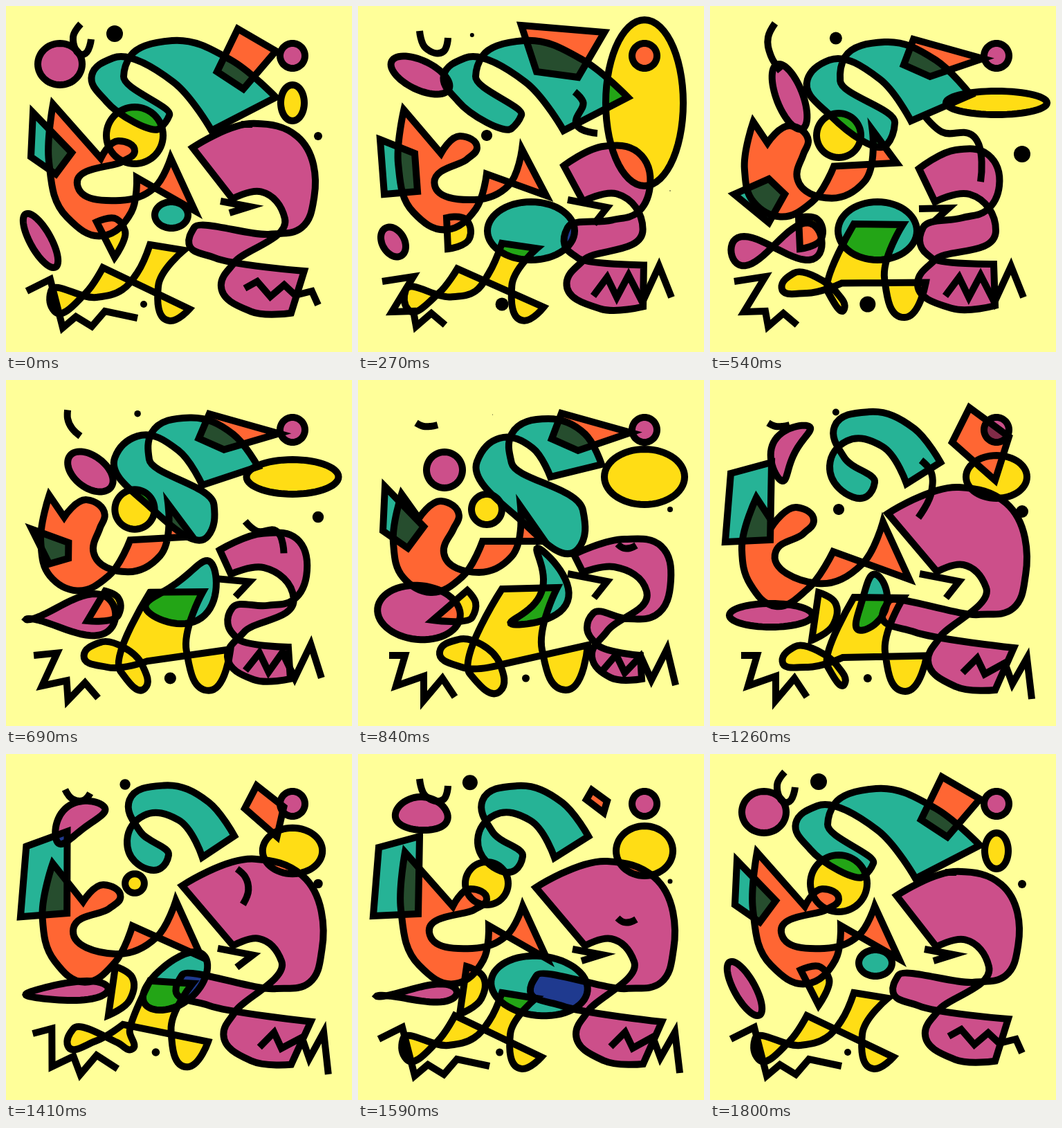
An HTML page with a canvas that plays this animation: 500x500 px, repeating every 1830 ms.

```html
<!DOCTYPE html>
<html lang="en">
<head>
<meta charset="utf-8">
<title>Shifting shapes</title>
<style>
  html, body { margin: 0; width: 100%; height: 100%; overflow: hidden; background: #ffff99; }
  canvas { display: block; width: 500px; height: 500px; }
</style>
</head>
<body>
<canvas id="stage" width="500" height="500"></canvas>
<script>
const ctx = document.getElementById('stage').getContext('2d');
const LOOP = 1830, CYCLE = 1800, STEP = 30, TURN = 2 * Math.PI;
const TIMES = [0, 270, 540, 840, 1260, 1590];
const COUNT = TIMES.length;

const COLORS = { teal: '#26b396', orange: '#ff6633', yellow: '#ffdd15', pink: '#cc4f8a' };
// Colour where two fills overlap
const MIX = {
  'orange teal': '#264d2e', 'teal yellow': '#23a516', 'pink teal': '#1f3a8f',
  'pink yellow': '#ff6633', 'orange yellow': '#ff6633', 'orange pink': '#802b47'
};

// ---- Timing: every value takes a key at each of TIMES and blends softly round the loop

const wrap = i => (i + COUNT) % COUNT;
const timeOf = i => TIMES[wrap(i)] + CYCLE * Math.floor(i / COUNT);

function blend(keys, t) {
  let i = COUNT - 1;
  while (TIMES[i] > t) i--;
  const span = timeOf(i + 1) - timeOf(i), u = (t - timeOf(i)) / span;
  const key = j => keys[wrap(j)];
  const slope = j => 0.6 * span * (key(j + 1) - key(j - 1)) / (timeOf(j + 1) - timeOf(j - 1));
  const w = u * u * (3 - 2 * u);
  return key(i) * (1 - w) + key(i + 1) * w
    + u * (1 - u) * (1 - u) * slope(i) + u * u * (u - 1) * slope(i + 1);
}

// A channel is a constant, a function of time or a list of keys
const valueOf = (channel, t) =>
  Array.isArray(channel) ? blend(channel, t) :
  typeof channel === 'function' ? channel(t) : channel;

const sway = (middle, reach) => t => middle - reach * Math.cos(TURN * t / CYCLE);

// ---- Outlines through points

// Key 1.3 is pose 1 moved 30% of the way to pose 2; keys may run past either end
function keyed(keys, poses) {
  const rows = poses.map(text => text.match(/\d+/g).map(Number));
  return rows[0].map((_, k) => keys.map(key => {
    const i = Math.max(0, Math.min(rows.length - 2, Math.floor(key)));
    return rows[i][k] + (rows[i + 1][k] - rows[i][k]) * (key - i);
  }));
}

// Handles that follow the curve through a smooth point
function handles(prev, p, next) {
  const ax = p[0] - prev[0], ay = p[1] - prev[1], bx = next[0] - p[0], by = next[1] - p[1];
  const la = Math.hypot(ax, ay) || 0.01, lb = Math.hypot(bx, by) || 0.01;
  const dx = ax / la * lb + bx / lb * la, dy = ay / la * lb + by / lb * la;
  const d = Math.hypot(dx, dy) || 1;
  const back = 0.37 * Math.min(la, 1.6 * lb) / d, ahead = 0.37 * Math.min(lb, 1.6 * la) / d;
  return [[p[0] - dx * back, p[1] - dy * back], [p[0] + dx * ahead, p[1] + dy * ahead]];
}

// In a mask, "x" is a sharp corner and "o" a smooth point
function trace(mask, channels, open, t) {
  const path = new Path2D(), n = mask.length;
  const v = channels.map(channel => blend(channel, t));
  const pts = [...mask].map((_, i) => [v[2 * i], v[2 * i + 1]]);
  const ctl = pts.map((p, i) =>
    mask[i] === 'x' ? [p, p] : handles(pts[(i + n - 1) % n], p, pts[(i + 1) % n]));
  path.moveTo(...pts[0]);
  for (let i = 0; i < (open ? n - 1 : n); i++) {
    const j = (i + 1) % n;
    if (mask[i] + mask[j] === 'xx') path.lineTo(...pts[j]);
    else path.bezierCurveTo(...ctl[i][1], ...ctl[j][0], ...pts[j]);
  }
  if (!open) path.closePath();
  return path;
}

function blob(color, mask, keys, ...poses) {
  const channels = keyed(keys, poses);
  return { color, path: t => trace(mask, channels, false, t) };
}

function line(mask, keys, ...poses) {
  const channels = keyed(keys, poses);
  return t => trace(mask, channels, true, t);
}

// ---- Ovals that can tilt, bend like a bean or twist into an eight

function oval(color, { x, y, rx, ry = rx, tilt = 0, bend = 0, twist = 0 }) {
  const channels = [x, y, rx, ry, tilt, bend, twist];
  const path = t => {
    const [cx, cy, a, b, angle, curl, eight] = channels.map(channel => valueOf(channel, t));
    const p = new Path2D(), c = Math.cos(angle), s = Math.sin(angle);
    for (let i = 0; i < 60; i++) {
      const q = TURN * i / 60, u = Math.cos(q);
      const px = Math.max(0.5, a) * u;
      const py = Math.max(0.5, b) * Math.sin(q) + curl * u * u + eight * Math.sin(2 * q);
      p.lineTo(cx + px * c - py * s, cy + px * s + py * c);
    }
    p.closePath();
    return p;
  };
  return { color, path };
}

// ---- The picture

const shapes = [
  blob('teal', 'xoooooooooox', [0, 0, 0.35, 1, 2, 2],
    '390,132 325,78 240,50 180,72 170,102 236,158 222,177 145,138 124,100 155,75 242,110 297,180',
    '352,122 328,78 275,56 222,78 222,120 325,188 318,244 230,198 172,118 205,84 252,98 278,140',
    '333,119 295,70 230,46 180,67 194,112 238,148 227,168 186,156 173,124 198,88 249,96 284,150'),
  blob('orange', 'xxooooooxxxoooo', [1, 1.35, 2.1, 2, 0, 1],
    '67,170 92,208 125,184 150,203 135,222 95,248 155,294 220,266 250,205 288,288 178,248 140,303 95,327 58,295 46,245',
    '68,142 137,220 162,195 186,210 168,225 103,258 165,281 215,262 238,220 273,296 189,248 181,298 140,332 88,305 62,225',
    '63,165 88,200 120,175 146,196 138,215 124,250 175,278 222,255 235,183 270,233 180,233 150,285 105,307 65,285 51,235'),
  blob('pink', 'xooooooooxxooooox', [0.28, 0.9, 1, 2, 0, 0],
    '257,193 360,155 428,178 456,282 438,330 388,339 258,320 249,343 295,364 439,387 412,448 355,443 315,405 332,372 399,300 366,267 328,277',
    '302,235 355,208 402,215 418,260 400,295 365,306 308,320 304,345 320,364 410,373 412,433 350,437 300,400 325,367 413,325 375,272 325,283',
    '312,252 385,230 438,240 452,290 430,340 390,345 340,337 331,358 345,382 408,398 410,432 365,430 338,400 360,363 417,305 370,270 325,278'),
  blob('yellow', 'xxooxxoooooo', [0, 0.05, 0.7, 1, 0.72, 0],
    '208,345 257,353 220,405 237,455 265,438 140,378 115,415 70,441 65,412 130,421 168,410 190,385',
    '208,302 288,300 266,390 300,448 332,383 212,410 150,415 118,393 145,375 205,410 205,450 162,425'),
  blob('teal', 'xxxx', [1, 2, 3, 1, 0, 0],
    '30,135 89,119 87,231 22,234',
    '39,154 95,212 72,243 36,218',
    '32,193 82,213 86,268 38,272',
    '35,272 85,250 108,272 85,313'),
  blob('orange', 'xxxx', [1, 2, 3, 3, 0, 4],
    '375,40 432,82 412,145 350,90',
    '335,33 390,65 343,120 305,95',
    '236,28 356,38 318,103 258,95',
    '294,48 394,76 318,102 280,85',
    '338,52 360,68 355,85 330,66'),
  blob('yellow', 'xoox', [0, 1, 1, 2, 3, 3],
    '131,312 160,308 172,325 157,363',
    '128,306 155,308 161,336 130,351',
    '158,304 170,322 165,343 108,347',
    '157,307 181,322 178,354 147,376'),
  oval('pink', {
    x: [78, 90, 115, 125, 107, 92], y: [84, 100, 131, 130, 98, 86],
    rx: [32, 46, 50, 26, 44, 38], ry: [30, 21, 19, 26, 17, 24],
    tilt: [0, 0.45, 1.2, 0, -1.1, 0.05], bend: [0, 0, 0, 0, 18, 4]
  }),
  oval('teal', {
    x: [239, 250, 242, 284, 237, 262], y: [302, 325, 325, 313, 324, 335],
    rx: [24, 63, 57, 58, 42, 70], ry: [19, 42, 42, 20, 18, 43],
    tilt: [0, 0, 0, -1.23, -1.28, 0.1], bend: [0, 0, 0, -45, -10, 0]
  }),
  oval('pink', {
    x: [50, 51, 96, 88, 88, 85], y: [339, 341, 347, 336, 340, 347],
    rx: [44, 23, 66, 60, 60, 58], ry: [15, 16, 4, 39, 17, 9],
    tilt: [1.06, 1.05, -0.15, 0.1, 0, -0.05], twist: [0, 0, 24, 0, 0, 6]
  }),
  oval('pink', { x: 414, y: 72, rx: 18 }),
  oval('yellow', { x: 414, y: 140, rx: [17, 56, 73, 58, 44, 41], ry: [26, 120, 17, 40, 31, 36] }),
  oval('yellow', { x: 186, y: 187, rx: [41, 3, 32, 22, 3, 31] })
];

const lines = [
  line('xoox', [0, 1, 2, 3, 3, 1],
    '108,26 97,45 112,70 123,48',
    '89,36 98,61 123,66 130,46',
    '94,25 84,45 88,72 102,94',
    '84,62 95,67 105,67 115,65'),
  line('xoox', [0, 1, 2, 4, 3, 4],
    '340,171 345,171 350,171 356,171',
    '313,124 325,138 316,172 346,184',
    '311,160 335,182 378,186 391,254',
    '305,116 318,130 320,162 301,199',
    '375,237 384,243 393,243 402,239'),
  line('xxx', [0, 1, 2, 1, 1, 0],
    '310,282 352,290 323,299',
    '303,280 360,291 341,315',
    '302,293 345,292 323,312'),
  line('xxxxxxx', [0, 1, 1, 1.5, 2, 2],
    '345,408 363,398 382,420 402,403 418,418 442,412 451,432',
    '340,419 360,392 374,421 391,389 411,428 435,376 453,421',
    '365,423 386,402 397,425 426,409 437,439 458,402 465,461'),
  line('xxxxxxx', [0, 1, 1, 2, 2, 0],
    '30,412 64,395 82,465 101,449 124,463 143,441 190,451',
    '35,398 80,391 49,442 80,441 84,463 106,444 126,461',
    '45,398 68,398 55,442 95,428 95,463 122,431 140,458')
];

const dots = [
  { x: sway(176, 19), y: sway(45, 5), r: [12, 3, 9, 0.5, 5, 11] },
  { x: 451, y: [188, 267, 214, 187, 190, 184], r: [6, 0.7, 12, 4, 9, 3.5] },
  { x: sway(221, 22), y: 431, r: [5, 9.5, 11.5, 5.5, 6, 5.5] }
];

function fillOverlap(a, b, color) {
  ctx.save();
  ctx.clip(a);
  ctx.fillStyle = color;
  ctx.fill(b);
  ctx.restore();
}

function draw(t) {
  ctx.fillStyle = '#ffff99';
  ctx.fillRect(0, 0, 500, 500);
  const paths = shapes.map(shape => shape.path(t));
  paths.forEach((path, i) => {
    ctx.fillStyle = COLORS[shapes[i].color];
    ctx.fill(path);
  });
  paths.forEach((a, i) => {
    for (let j = i + 1; j < paths.length; j++) {
      const mix = MIX[[shapes[i].color, shapes[j].color].sort().join(' ')];
      if (mix) fillOverlap(a, paths[j], mix);
    }
  });
  ctx.strokeStyle = ctx.fillStyle = '#000';
  ctx.lineWidth = 10;
  ctx.miterLimit = 10;
  paths.forEach(path => ctx.stroke(path));
  lines.forEach(path => ctx.stroke(path(t)));
  for (const { x, y, r } of dots) {
    ctx.beginPath();
    ctx.arc(valueOf(x, t), valueOf(y, t), Math.max(0, valueOf(r, t)), 0, TURN);
    ctx.fill();
  }
}

const start = performance.now();
function tick() {
  const ms = (performance.now() - start) % LOOP;
  draw(Math.floor(ms / STEP) * STEP % CYCLE);
  requestAnimationFrame(tick);
}
tick();
</script>
</body>
</html>
```
